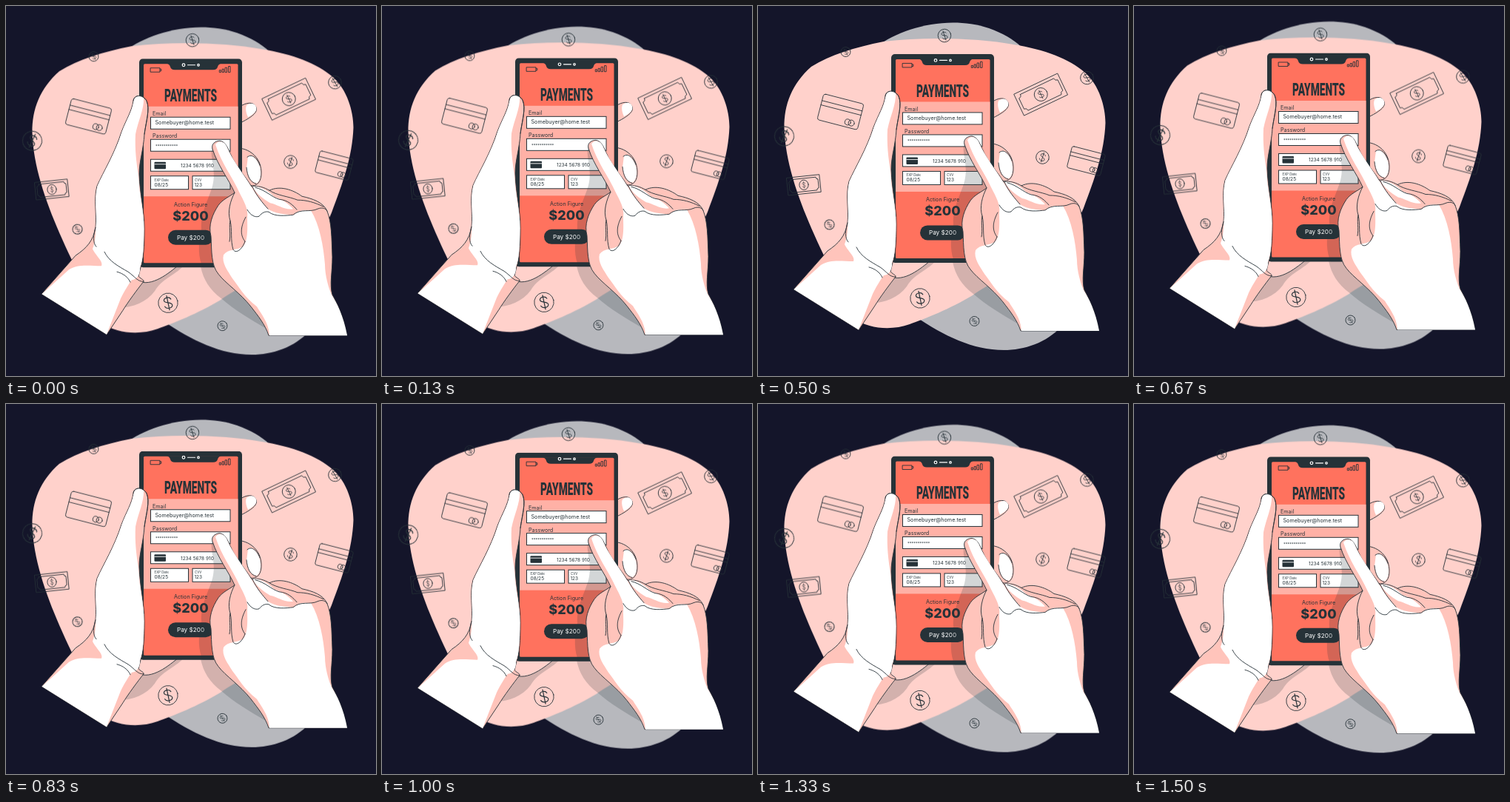
An HTML page without scripts that plays this animation: 500x500 px, repeating every 1.54 s.

```html
<!DOCTYPE html>
<html lang="en">
<head>
<meta charset="utf-8">
<title>Mobile payment</title>
<style>
  :root { --ink: #263238; --coral: #ff725e; --blush: #ffd1cb; --skin: #ffc4bb; }
  html, body { margin: 0; width: 100%; height: 100%; overflow: hidden; background: #14152a; }
  svg { display: block; width: 100vw; height: 100vh; }
  .float { animation: float 770ms cubic-bezier(.364, 0, .636, 1) -45ms infinite alternate; }
  @keyframes float {
    from { transform: translateY(-.7px); }
    to { transform: translateY(-8.6px); }
  }
  .line { fill: none; stroke: var(--ink); stroke-width: .9; stroke-linecap: round; stroke-linejoin: round; }
  .line *, #coin *, #card *, #bill * { vector-effect: non-scaling-stroke; }
  .skin { fill: var(--skin); stroke: var(--ink); stroke-width: .9; stroke-linejoin: round; }
  .white { fill: #fff; }
  .ink { fill: var(--ink); }
  .shade { fill: #263238; opacity: .2; }
  .field { fill: #fff; stroke: var(--ink); stroke-width: 1; }
  text { font-family: Inter, "Open Sans", sans-serif; fill: var(--ink); }
  .label { font-size: 7.2px; }
  .tiny { font-size: 4.4px; }
  .mid { text-anchor: middle; }
  .title { font: 900 24.6px Roboto, Inter, sans-serif; }
</style>
</head>
<body>
<svg viewBox="0 0 500 500" preserveAspectRatio="none">
  <defs>
    <g id="dollar">
      <path d="M3.6-3.2C2.4-6.6-4-6-3.6-2.8C-3.2 0 3.6-.4 3.8 2.8C4 6.4-2.8 6.4-4 3M0-7.4V7.4"/>
    </g>
    <g id="coin">
      <circle r="10"/>
      <use href="#dollar"/>
    </g>
    <g id="card">
      <rect x="-28" y="-18" width="56" height="36" rx="3"/>
      <path d="M-28-8.5H28M-28-2.5H28"/>
      <circle cx="13" cy="11" r="4"/>
      <circle cx="18" cy="11" r="4"/>
    </g>
    <g id="bill">
      <rect x="-32.500" y="-16" width="65" height="32"/>
      <path d="M-25-12H25Q25-8 29-8V8Q25 8 25 12H-25Q-25 8-29 8V-8Q-25-8-25-12Z"/>
      <circle r="9"/>
      <use href="#dollar" transform="scale(.8)"/>
    </g>
  </defs>

  <g class="float">
    <!-- backdrop -->
    <path fill="#b7b8bd" d="M160 62C195 36 257 19 312 37C348 50 370 70 380 100L410 440C390 462 360 472 332 472C290 472 250 452 215 428Z"/>
    <path fill="var(--blush)" d="M35.500 172C35 140 46 112 72 89C98 73 130 63 170 55C230 48 300 51 345 59C388 66 420 78 442 97C461 114 469.500 143 469.500 165C468 205 455 240 440 280C420 330 330 370 290 398C260 416 225 430 205 437C180 446 150 443 130 430C100 360 38 260 35.500 172Z"/>

    <g class="line">
      <use href="#card" transform="translate(111.500 150) rotate(14.5)"/>
      <use href="#card" transform="translate(443.500 216.500) rotate(14.5) scale(.83)"/>
      <use href="#bill" transform="translate(382.300 126.500) rotate(-25.500)"/>
      <use href="#bill" transform="translate(62 248.800) rotate(-6) scale(.68 .74)"/>
      <use href="#coin" transform="translate(252 47) rotate(-18) scale(.88)"/>
      <use href="#coin" transform="translate(118.5 69) rotate(-30) scale(.65)"/>
      <use href="#coin" transform="translate(444.5 104) rotate(-30) scale(.88)"/>
      <use href="#coin" transform="translate(384.5 211.5) rotate(18) scale(.88)"/>
      <use href="#coin" transform="translate(35.5 183) rotate(25) scale(1.3)"/>
      <use href="#coin" transform="translate(96.5 302.5) rotate(-30) scale(.65)"/>
      <use href="#coin" transform="translate(219 402) rotate(-12) scale(1.32)"/>
      <use href="#coin" transform="translate(292.5 433) rotate(-35) scale(.65)"/>
    </g>

    <!-- cast shadows and the palm behind the phone -->
    <path class="shade" d="M152 409C172 408 190 401 201 386C211 369 226 366 240 352H180Z"/>
    <path class="shade" d="M263 353C267 371 275 384 291 396C308 411 330 424 352 437L330 370L285 352Z"/>
    <path class="skin" style="fill:var(--blush)" d="M174 370C193 383 216 365 232 352L222 335H174Z"/>
    <path class="skin" d="M316 137C324 131 334 130 337 136C342 143 334 150 318 158Z"/>
    <path class="white" d="M325 135C331 131 336 132 338 137C340 143 334 147 327 151C325 147 323 140 325 135Z"/>
    <path class="skin" d="M316 193C326 194 335 200 340 208C346 217 347 233 341 240C334 247 325 243 316 232Z"/>
    <path class="white" d="M327 204C333 200 339 208 342 215C346 226 344 237 339 240C331 240 327 232 325 220Z"/>
    <path class="line" d="M326 205C333 199 340 208 343 216M325 219C326 231 330 239 338 241"/>
    <path class="skin" d="M316 290C323 294 324 310 320 320H316Z"/>
    <path class="skin" d="M182 214C173 220 171 232 182 244Z"/>

    <!-- phone -->
    <rect class="ink" x="180" y="72" width="139" height="282" rx="5"/>
    <rect fill="var(--coral)" x="186" y="79" width="127.500" height="269" rx="1.500"/>
    <rect fill="#ffb1a6" x="186" y="136.500" width="127.500" height="121.500"/>
    <path class="ink" d="M217 78.500Q221 79 222 83Q223 87 228 87H280Q285 87 286 83Q287 79 291 78.500Z"/>
    <g fill="none" stroke="#fff" stroke-width="1.200" stroke-linecap="round">
      <circle cx="240" cy="80.500" r="1.800"/>
      <circle cx="260" cy="80.500" r="1.300"/>
      <path d="M245.500 80.500H255.500"/>
    </g>
    <g class="line">
      <path d="M195.500 84.500H208V90H195.500ZM208 86H209.800V88.500H208"/>
      <path d="M288.300 90V87.500H290.500V90ZM292.200 90V86H294.400V90ZM296.100 90V84H298.500V90ZM300.500 90V82.300H303V90Z"/>
    </g>

    <text class="title mid" transform="translate(249.500 129.700) scale(.56 1)">PAYMENTS</text>
    <text class="label" x="198" y="149">Email</text>
    <text class="label" x="198" y="179">Password</text>
    <g class="field">
      <rect x="195.500" y="151" width="107.500" height="16"/>
      <rect x="195.500" y="181" width="107.500" height="16"/>
      <rect x="195.500" y="208" width="107.500" height="16"/>
      <rect x="195.500" y="230.500" width="51" height="18"/>
      <rect x="252" y="230.500" width="51" height="18"/>
    </g>
    <text class="label" x="201.500" y="161">Somebuyer@home.test</text>
    <text x="202" y="192.500" font-size="5.500">***********</text>
    <rect class="ink" x="200.500" y="211.500" width="15.500" height="9.500" rx="1"/>
    <path d="M200.500 214.500H216" stroke="#fff" stroke-width=".9"/>
    <text x="236" y="219" font-size="6.500">1234 5678 910</text>
    <text class="tiny" x="200.500" y="237.500">EXP Date</text>
    <text x="200.500" y="244.500" font-size="6.600">08/25</text>
    <text class="tiny" x="255" y="237.500">CVV</text>
    <text x="254.500" y="244.500" font-size="6.400">123</text>
    <text class="label mid" x="249.500" y="271.500">Action Figure</text>
    <text class="mid" x="249.500" y="290.500" font-size="18" font-weight="800">$200</text>
    <rect class="ink" x="219" y="303.500" width="61" height="20" rx="10"/>
    <text class="mid" x="249.500" y="316.500" font-size="8.200" style="fill:#fff">Pay $200</text>

    <path class="shade" d="M279 190C274 204 285 222 279 244C273 265 263 278 264 302C259 323 260 342 266 354H319V250L300 205Z"/>

    <!-- left hand -->
    <path class="skin" d="M172 129C173 120 185 120 190 129C195 140 189 158 187 174C186 194 180 210 180 228C181 257 187 276 187 302C187 326 186 343 182 354L179 366C184 371 186 370 186 373C178 383 164 402 158 412L136 445L48 390L94 338C109 328 118 318 121 300C123 281 118 263 123 244C132 224 147 200 156 171C163 153 170 143 172 129Z"/>
    <path class="white" d="M172.500 129C174 121 182 120.500 186 125C187 140 178 157 175 174C174 194 176 211 179 230C180 258 186.500 277 186.500 302C186 328 185 345 181 354C182 362 177 371 170 371C166 376 160 386 155 396L136 444.500L48.500 390L85 357C98 349 112 352 129 352C132 346 121 338 117 329C121 318 121 310 121.500 300C123.500 281 118.500 263 123.500 244C132.500 224 147.500 200 156.500 171C163.500 153 170.500 143 172.500 129Z"/>
    <path class="line" d="M121 300C118 310 117 321 122 326M133 333C139 346 153 353 165 360C174 366 178 374 186 373M150 360C158 362 165 367 168 374M172 129C173 120 185 120 190 129C195 140 189 158 187 174"/>

    <!-- right hand -->
    <path class="skin" d="M279 194C277 187 283 183 289 183C296 184 299 191 303 200C310 217 323 230 332 245C341 243 349 246 356 250C370 243 388 249 400 258C414 261 429 266 434 278C440 293 440 312 441 340C441 361 437 377 441 391C447 402 456 419 461 446H355C350 431 341 420 331 407C316 388 297 376 287 363C277 351 278 332 277 312C273 297 279 282 287 270C293 262 301 259 309 253C301 235 286 216 279 194Z"/>
    <path class="white" d="M283 188C287 182 294 183 298 190C305 208 320 226 332 246C339 258 347 267 354 275C362 281 379 283 389 283C398 274 406 278 412 277C424 297 429 325 431 350C431 365 436 382 440 391C447 402 456 419 461 446H356C355 428 344 416 339 407C322 394 314 379 306 369C300 359 291 348 294 337C300 329 312 331 320 326C328 318 326 297 326 287C328 275 321 264 315 252C306 232 291 213 283 188Z"/>
    <path class="white" d="M333 245C343 243 355 251 363 259C374 263 381 267 388 275C377 277 367 269 357 267C347 261 339 255 333 245Z"/>
    <path class="line" d="M309 253C303 264 299 279 303 291C306 303 303 317 307 330C311 336 319 330 323 319M324 286C318 297 315 309 323 319M326 276C330 283 336 287 342 285C346 280 350 278 355 279C363 286 379 284 388 283C398 274 411 280 421 275C428 272 433 275 434 278M333 245C339 258 347 267 354 275M337 246C350 249 359 259 369 262C381 263 388 270 393 276M356 250C366 257 382 258 394 263C406 263 417 266 429 272M303 291C301 297 304 310 302 319"/>
  </g>
</svg>
</body>
</html>
```
